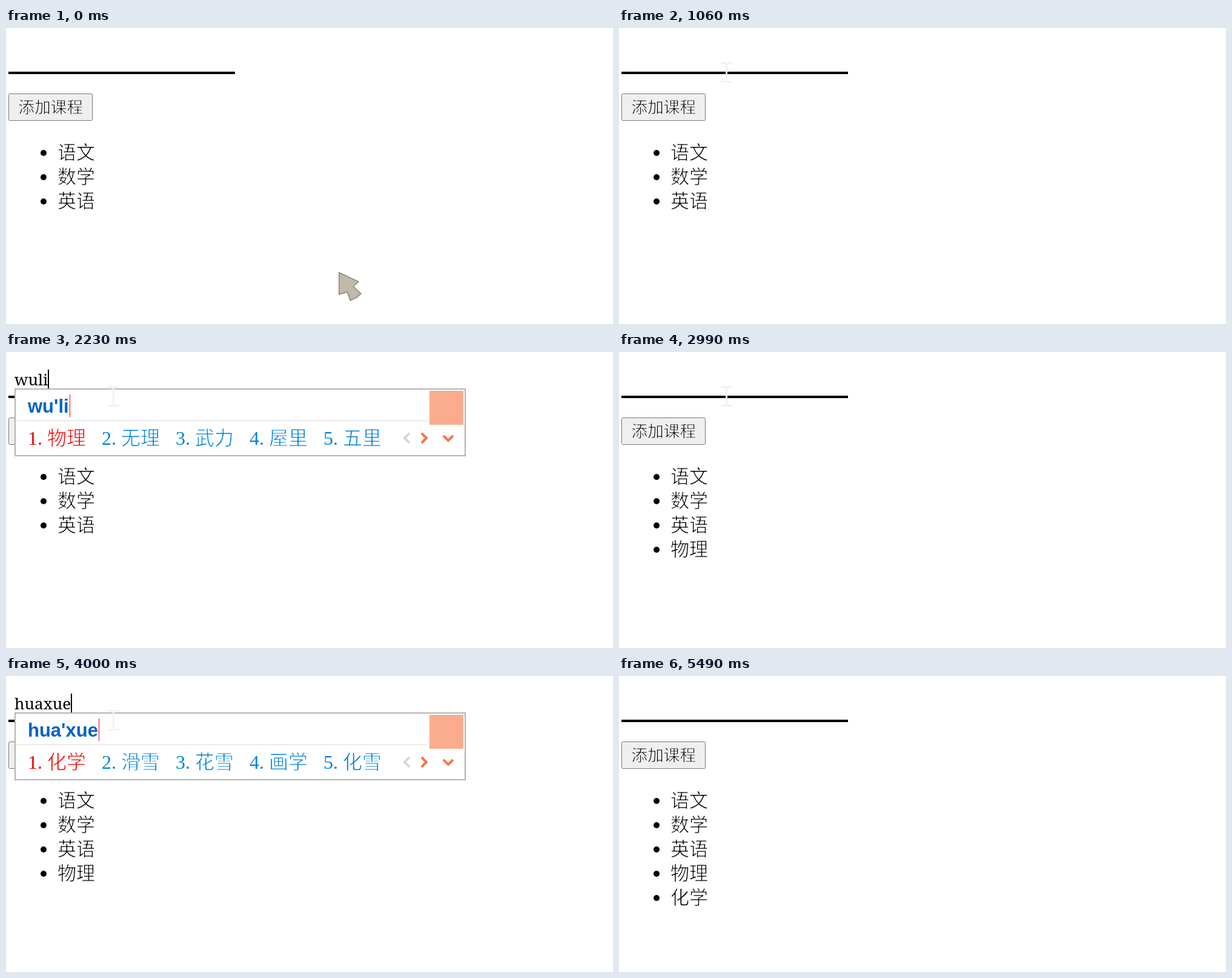
An HTML page with a canvas for the animation above (5.56 s loop, 1002 px wide and 488 px high).

```html
<!DOCTYPE html>
<html lang="zh-CN">
<head>
<meta charset="utf-8">
<title>添加课程</title>
<style>
html, body { margin: 0; width: 100%; height: 100%; overflow: hidden; background: #fff; }
canvas { display: block; }
</style>
</head>
<body>
<canvas id="stage" width="1002" height="488"></canvas>
<script>
const ctx = document.getElementById('stage').getContext('2d');
const LOOP = 5560;
const CJK = '"Noto Sans CJK SC", "Noto Sans CJK", sans-serif';
const hanzi = size => `300 ${size}px ${CJK}`;
const FIELD = `26px "Noto Serif", ${CJK}`;

// Input states: start time, field text, composition, candidates, extra candidate
const typing = [
  [0, ''],
  [1380, 'w', 'w', '我 为 无 玩 文'],
  [1460, 'wu', 'wu', '无 吴 五 物 ⑤'],
  [1840, 'wu', 'wu', '无 吴 五 物 ⑤', '更多特殊符号'],
  [1920, 'wul', "wu'l", '物理 无论 物流 武力 屋里'],
  [2230, 'wuli', "wu'li", '物理 无理 武力 屋里 五里'],
  [2460, '物理'],
  [2610, ''],
  [3390, 'h', 'h', '好 很好 还是 后来 会'],
  [3540, 'hu', 'hu', '湖 户 互 护 呼'],
  [3620, 'hua', 'hua', '话 化 画 花 ❀'],
  [3770, 'huax', "hua'x", '化学 滑雪 花絮 花心 花香'],
  [3850, 'huaxu', "hua'xu", '化学 滑雪 花絮 花需 画序'],
  [4000, 'huaxue', "hua'xue", '化学 滑雪 花雪 画学 化雪'],
  [4080, '化学'],
  [4400, '']
];

const pointer = [
  [0, 'arrow', 549, 402], [70, 'arrow', 525, 388], [150, 'arrow', 460, 350],
  [220, 'arrow', 370, 295], [300, 'arrow', 280, 235], [370, 'arrow', 212, 180],
  [450, 'arrow', 188, 97], [530, 'beam', 178, 73], [4630, 'beam', 188, 74],
  [4700, 'arrow', 205, 82], [4780, 'arrow', 241, 97], [4950, 'arrow', 510, 305],
  [5030, 'none']
];

const caretTimes = [[0, 0], [600, 1], [1060, 0], [1380, 1], [2990, 0],
  [3390, 1], [4700, 0], [5180, 1], [5490, 0]];

const courses = [[0, '语文'], [0, '数学'], [0, '英语'], [2610, '物理'], [4400, '化学']];

const at = (steps, t) => steps.filter(s => s[0] <= t).pop();

function rect(x, y, w, h, color) {
  ctx.fillStyle = color;
  ctx.fillRect(x, y, w, h);
}

function text(str, x, y, font, color = '#000') {
  ctx.font = font;
  ctx.fillStyle = color;
  ctx.fillText(str, x, y);
  return ctx.measureText(str).width;
}

// Trims the glyph edges with the background colour for a finer stroke
function thinText(str, x, y, font, color, back = '#fff') {
  text(str, x, y, font, color);
  ctx.strokeStyle = back;
  ctx.lineWidth = 0.8;
  ctx.lineJoin = 'round';
  ctx.strokeText(str, x, y);
}

function line(points, color, width) {
  ctx.beginPath();
  points.forEach(([x, y]) => ctx.lineTo(x, y));
  ctx.strokeStyle = color;
  ctx.lineWidth = width;
  ctx.lineJoin = 'miter';
  ctx.stroke();
}

function drawPage(t) {
  rect(0, 0, 1002, 488, '#fff');
  rect(4, 72, 374, 4, '#000');
  ctx.beginPath();
  ctx.roundRect(4.5, 108.5, 138, 44, 2);
  ctx.fillStyle = '#efefef';
  ctx.fill();
  ctx.strokeStyle = '#767676';
  ctx.lineWidth = 1;
  ctx.stroke();
  thinText('添加课程', 20.5, 140, hanzi(26.67), '#000', '#efefef');
  courses.filter(c => c[0] <= t).forEach(([, name], i) => {
    const y = 206 + i * 40;
    ctx.beginPath();
    ctx.arc(62, y, 5, 0, 7);
    ctx.fillStyle = '#000';
    ctx.fill();
    thinText(name, 85, y + 10, hanzi(31), '#000');
  });
}

function layoutItems(words) {
  let x = 36;
  const items = words.split(' ').map((word, i) => {
    const font = word === '❀' ? '24px "DejaVu Sans", sans-serif' : hanzi(32);
    ctx.font = font;
    const item = { word, font, x, label: `${i + 1}.` };
    x += 32 + ctx.measureText(word).width + 26;
    return item;
  });
  return { items, end: x - 26 };
}

function drawPopup(preedit, words, extra) {
  const { items, end } = layoutItems(words);
  const right = Math.round(end + 139);
  rect(14, 60, right - 14, 112, '#b4b4b8');
  rect(16, 62, right - 18, 108, '#fff');
  rect(16, 113, right - 80, 1, '#d8d8d8');
  rect(right - 60, 64, 56, 56, '#fbab8e');

  const w = text(preedit, 36, 100, 'bold 31px "Liberation Sans", Arial, sans-serif', '#0062c8');
  rect(Math.round(37 + w), 70, 1, 37, '#f00');
  if (extra) {
    text('6.', 180, 97, '24px "Liberation Serif", serif', '#1166cc');
    thinText(extra, 204, 98, hanzi(24), '#1166cc');
  }
  items.forEach(({ word, font, x, label }, i) => {
    const color = i ? '#0082dc' : '#f50000';
    text(label, x, 153, '32px "Liberation Serif", serif', color);
    thinText(word, x + 32, 153, font, color);
  });

  line([[right - 93, 134], [right - 101, 142], [right - 93, 150]], '#dcd6d4', 4);
  line([[right - 73, 134], [right - 65, 142], [right - 73, 150]], '#ff7142', 4);
  line([[right - 37, 138], [right - 29, 146], [right - 21, 138]], '#ff7142', 4);
}

function drawArrow(x, y) {
  const shape = [[0, 0], [34, 16], [25, 24], [38, 36], [30, 43], [19, 48], [14, 34], [0, 38]];
  ctx.beginPath();
  shape.forEach(([dx, dy]) => ctx.lineTo(x + dx, y + dy));
  ctx.closePath();
  ctx.fillStyle = '#c1b9ab';
  ctx.fill();
  ctx.save();
  ctx.clip();
  ctx.strokeStyle = '#8b857b';
  ctx.lineWidth = 3;
  ctx.stroke();
  ctx.restore();
}

function drawBeam(x, y, inverted, covered) {
  const color = '#f1f1f1';
  for (const top of [y - 17, y + 14]) {
    rect(x - 10, top, 8, 3, color);
    rect(x + 1, top, 8, 3, color);
  }
  rect(x - 2, y - 15, 3, 30, color);
  if (!covered) rect(x - 2, 72, 3, 4, inverted ? '#fff' : '#000');
}

function draw(t) {
  const [, typed, preedit, words, extra] = at(typing, t);
  const [, kind, x, y] = at(pointer, t);
  drawPage(t);
  const w = text(typed, 14, 54.5, FIELD);
  if (at(caretTimes, t)[1]) rect(Math.round(14 + w), 29, 2, 33, '#000');
  if (preedit) drawPopup(preedit, words, extra);
  if (kind === 'arrow') drawArrow(x, y);
  if (kind === 'beam') drawBeam(x, y, t >= 680, !!preedit);
}

const start = performance.now();
function tick() {
  draw((performance.now() - start) % LOOP);
  requestAnimationFrame(tick);
}
tick();
</script>
</body>
</html>
```
